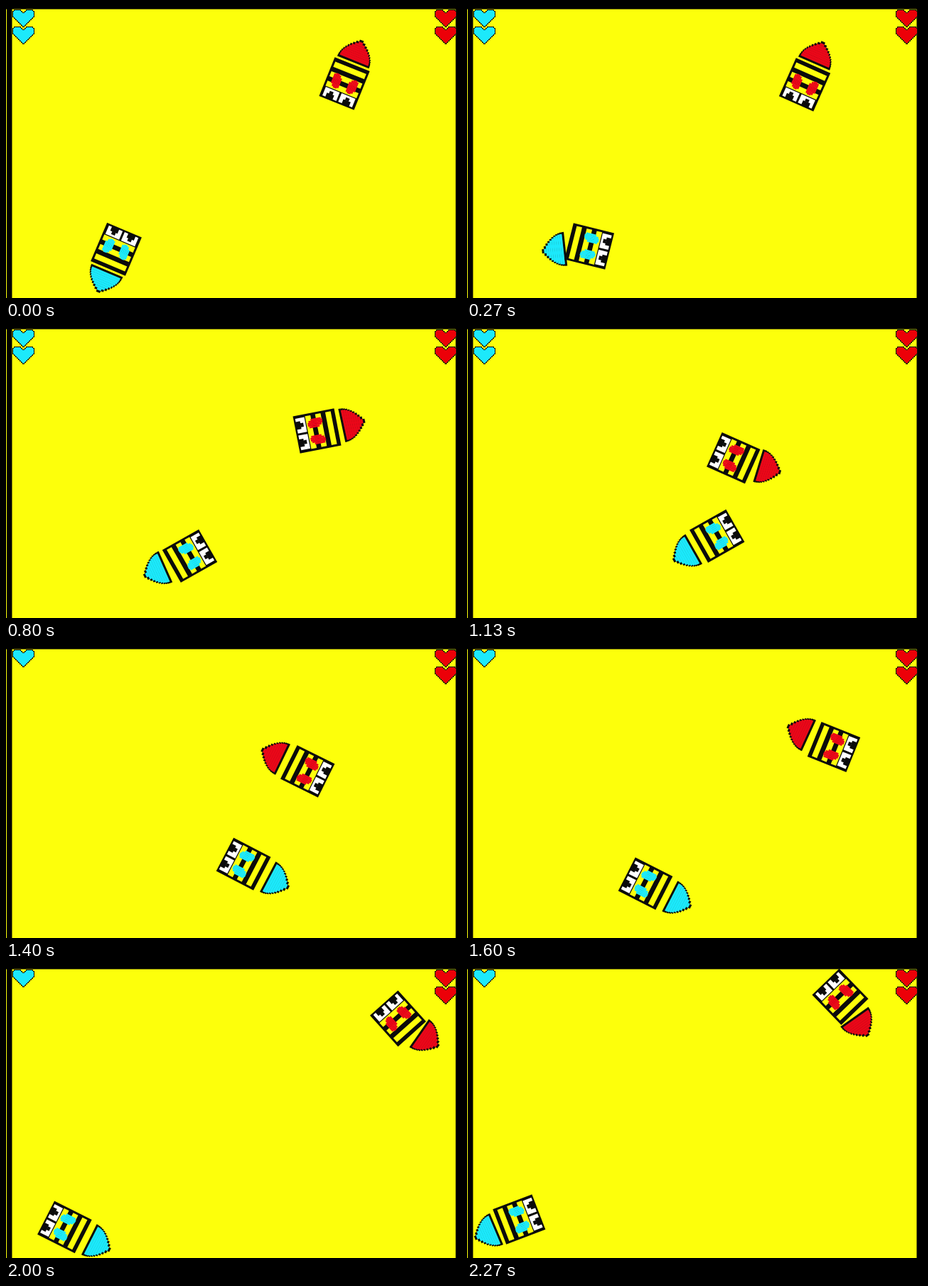
An HTML page with a canvas that plays this animation: 640 by 412 pixels, repeating every 2.34 s.

```html
<!DOCTYPE html>
<html lang="en">
<head>
<meta charset="utf-8">
<title>Bee duel</title>
<style>
  html, body { margin: 0; width: 100%; height: 100%; overflow: hidden; background: #fdff0b; }
  canvas { display: block; }
</style>
</head>
<body>
<canvas id="stage" width="640" height="412"></canvas>
<script>
const ctx = document.getElementById('stage').getContext('2d');
const LOOP = 2340, STEP = 200 / 3, LAST = 34, CLASH = 19;
const LEFT = 8.5, RIGHT = 632.5, TOP = 4.5;
const YELLOW = '#fdff0b', BLACK = '#0b0b0b', CYAN = '#1ce9fb', RED = '#ea0719', HEART_RED = '#ec0008';

const at = (step, x, y, heading) => ({ step, x, y, heading });

// Each leg is a smooth arc through two or three points; legs meet at turns and bounces.
const bees = [
  { color: CYAN, legs: [
    [at(0, 155, 343.3, -67), at(4, 172, 339, 14)],
    [at(4, 172, 339, 14), at(7, 187.5, 335, -2), at(12, 258.5, 324.5, -29.5)],
    [at(12, 258.5, 324.5, -29.5), at(CLASH, 389, 285, -29.5)],
    [at(CLASH, 389, 285, 208), at(24, 251, 335.3, 207), at(31, 54, 371, 207)],
    [at(31, 54, 371, -27), at(LAST, 73.3, 357.5, -21)]
  ] },
  { color: RED, legs: [
    [at(0, 476, 109.5, 112), at(4, 475, 111, 114)],
    [at(4, 475, 111, 114), at(7, 471.8, 118.3, 147), at(12, 437.5, 148, 169)],
    [at(12, 437.5, 148, 169), at(CLASH, 349.7, 201.6, 218)],
    [at(CLASH, 352, 199, 24), at(24, 516, 142.5, 22), at(27, 588, 106.3, 8)],
    [at(27, 588, 106.3, 172), at(32, 535, 57, 238), at(LAST, 525, 43.5, 226)]
  ] }
];

// Lagrange interpolation of one property through the points of a leg
function along(leg, key, step) {
  return leg.reduce((sum, p) => sum + leg.reduce(
    (term, q) => q === p ? term : term * (step - q.step) / (p.step - q.step), p[key]), 0);
}

function poseAt(legs, step) {
  const leg = legs.find(l => step <= l[l.length - 1].step);
  const before = Math.max(leg[0].step, step - 1);
  const x = along(leg, 'x', step), y = along(leg, 'y', step);
  const speed = Math.hypot(x - along(leg, 'x', before), y - along(leg, 'y', before));
  const wallGap = Math.min(x - LEFT, RIGHT - x);
  return {
    x, y,
    heading: along(leg, 'heading', step),
    // The stinger turns one step late, stretches with speed and is squashed near walls.
    tail: along(leg, 'heading', before),
    distance: Math.min(34 + Math.min(6, speed * 0.25), wallGap * 0.61)
  };
}

function box(color, x0, y0, x1, y1) {
  ctx.fillStyle = color;
  ctx.fillRect(x0, y0, x1 - x0, y1 - y0);
}

function inFrame(x, y, degrees, draw) {
  ctx.save();
  ctx.translate(x, y);
  ctx.rotate(degrees * Math.PI / 180);
  draw();
  ctx.restore();
}

// Stepped parabola tapering backwards from its base
function taper(color, start, count, halfWidth) {
  const cell = 3;
  for (let i = 0; i < count; i++) {
    const h = halfWidth * (1 - ((i + 0.3) / count) ** 2);
    box(color, start - (i + 1) * cell - 0.3, -h, start - i * cell, h);
  }
}

function stinger(color) {
  taper(BLACK, 1.5, 11, 24);
  taper(color, -1.5, 9, 21.5);
}

// Stepped, slightly slanted oval
function wing(color) {
  for (let y = 5.5; y < 18; y += 2.5) {
    const dy = y + 1.25 - 11.75;
    const half = 10.5 * Math.sqrt(1 - (dy / 7) ** 2), mid = 0.5 - dy * 0.35;
    box(color, mid - half, y, mid + half, y + 2.8);
  }
}

function eye() {
  box('#fff', 14, 1.5, 27, 22.5);
  box(BLACK, 21, 7, 28, 18);
  box(BLACK, 17, 9.5, 21.3, 15);
}

function body(color) {
  box(BLACK, -29.5, -26.5, 29.5, 26.5);
  for (const start of [-24, -9.5, 5]) box(YELLOW, start, -23.5, start + 7.8, 23.5);
  for (const side of [-1, 1]) {
    ctx.save();
    ctx.scale(1, side);
    eye();
    wing(color);
    ctx.restore();
  }
}

function heart(left, top, color) {
  const inside = (c, r) => {
    const a = Math.floor(Math.abs(c - 15) / 2) * 2;
    return Math.abs(c - 15) <= 15 && r >= Math.max(0, 4 - a, a - 12) && r < 25 - a;
  };
  for (let r = 0; r < 25; r++) {
    for (let c = 0; c <= 30; c++) {
      if (!inside(c, r)) continue;
      const core = inside(c - 1, r) && inside(c + 1, r) && inside(c, r - 1) && inside(c, r + 1);
      box(core ? color : BLACK, left + c, top + r, left + c + 1, top + r + 1);
    }
  }
}

function lives(left, count, color) {
  for (let i = 0; i < count; i++) heart(left, 5 + i * 24, color);
}

function render(time) {
  const step = Math.min(LAST, Math.floor((time % LOOP + 4) / STEP));
  box(YELLOW, 0, 0, 640, 412);
  box('#000', 0, 0, 640, TOP);
  box('#000', 1, 0, LEFT, 412);
  box('#000', RIGHT, 0, 640, 412);
  lives(9, step > CLASH ? 1 : 2, CYAN);
  lives(603, 2, HEART_RED);

  for (const { color, legs } of bees) {
    const { x, y, heading, tail, distance } = poseAt(legs, step);
    inFrame(x, y, tail, () => {
      ctx.translate(-distance, 0);
      stinger(color);
    });
    inFrame(x, y, heading, () => body(color));
  }
}

const begin = performance.now();
function tick() {
  render(performance.now() - begin);
  requestAnimationFrame(tick);
}
tick();
</script>
</body>
</html>
```
